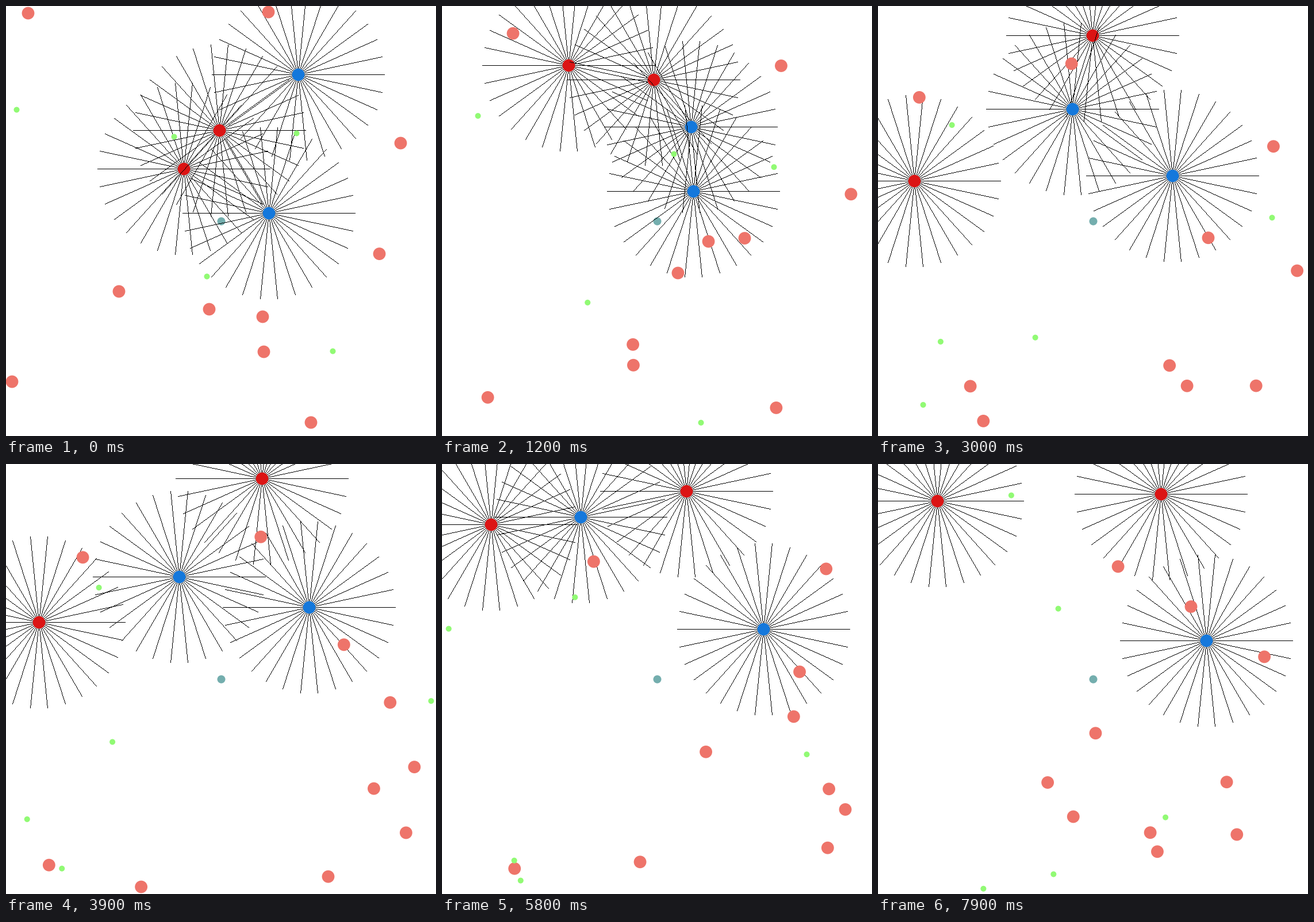
A matplotlib script for the animation above (8 s loop, 748x748 px).

```python
import numpy as np
import matplotlib.pyplot as plt
from matplotlib.animation import FuncAnimation
from matplotlib.patches import Circle

SIZE, DPI = 748, 100
FRAMES, STEP_MS, SUBSTEPS = 80, 100, 20
RED, BLUE = "#dc1414", "#1478dc"
SALMON, GREEN, TEAL = "#ee746a", "#91fa74", "#74aeae"
RAYS, REACH = 30, 150
CENTER, BUMPER = np.array([374.0, 374.0]), 84.5  # unseen ring that drifters bounce off

# Hunters steer along smooth curves through a few key points.
KEYS = np.array([0, 12, 21, 39, 49, 67, 79], float)
HUNTERS = [
    (RED, [(309, 283), (220, 103), (117, 246), (57, 275), (107, 135), (58, 105), (103, 64)]),
    (RED, [(371, 216), (368, 128), (312, 95), (445, 25), (419, 54), (449, 35), (492, 52)]),
    (BLUE, [(508, 119), (433, 210), (400, 167), (301, 196), (349, 161), (70, 5), (-138, -112)]),
    (BLUE, [(457, 360), (437, 322), (489, 330), (527, 249), (557, 225), (555, 348), (571, 307)]),
]

# Drifters fly straight from a start (x, y, vx, vy) and bounce.
PREY = [
    (38, 12, -11.84, 2.93), (353, 527, 9.17, -9.83), (686, 238, 2.08, 7.4),
    (456, 10, 11.12, 7.79), (649, 430.6, -10.25, -2.26), (10, 653, 5.76, 2.28),
    (530, 724, 4.24, -2.13), (446, 540, -9.53, 4.03), (196, 496, 11.37, 10.69),
    (448, 601, -3.17, -11.42),
]
POISON = [
    (18, 180, 3.67, 0.885), (505, 221, 6, 4.89), (349, 470, -8.02, 3.78),
    (568, 600, -9.83, 10.36), (292, 227, 9.25, 2.5),
]
# Caught drifters start afresh: frame -> (index, new state).
REBORN = {
    17: (14, (51, 679, 2.08, 1.1)),
    18: (1, (30, 153.8, -6.86, 0.385)),
    62: (8, (394, 456, -5.4, 5.3)),
}


def advance(pos, vel, lo, hi, dt):
    pos += vel * dt
    low, high = pos < lo, pos > hi
    pos[:] = np.where(low, 2 * lo - pos, np.where(high, 2 * hi - pos, pos))
    vel[low | high] *= -1
    gap = pos - CENTER
    dist = np.linalg.norm(gap, axis=1, keepdims=True)
    normal = gap / dist
    inward = np.sum(vel * normal, axis=1, keepdims=True)
    vel -= np.where((dist < BUMPER) & (inward < 0), 2 * inward, 0) * normal


def simulate():
    """Drifter positions for every frame."""
    state = np.array(PREY + POISON, float)
    pos, vel = state[:, :2], state[:, 2:]
    is_prey = np.arange(len(state))[:, None] < len(PREY)
    lo, hi = np.where(is_prey, 9.5, 4.5), np.where(is_prey, 738.5, 743.5)
    track = []
    for n in range(FRAMES):
        if n in REBORN:
            i, fresh = REBORN[n]
            state[i] = fresh
        track.append(pos.copy())
        pace = 1 if n < 67 else 1.117
        for _ in range(SUBSTEPS):
            advance(pos, vel, lo, hi, pace / SUBSTEPS)
    return track


def glide(pts, slopes, t):
    """Cubic Hermite curve through the key points."""
    i = int(np.clip(np.searchsorted(KEYS, t, "right") - 1, 0, len(KEYS) - 2))
    h = KEYS[i + 1] - KEYS[i]
    s = (t - KEYS[i]) / h
    return ((1 + 2 * s) * (1 - s) ** 2 * pts[i] + s * (1 - s) ** 2 * h * slopes[i]
            + s * s * (3 - 2 * s) * pts[i + 1] + s * s * (s - 1) * h * slopes[i + 1])


def ray_burst():
    """RGBA sprite of crisp one-pixel rays."""
    side = 2 * REACH + 1
    img = np.zeros((side, side, 4))
    for a in np.arange(RAYS) * 2 * np.pi / RAYS:
        tip = np.trunc(REACH * np.array([np.cos(a), np.sin(a)]) + 1e-6 * np.sign(np.cos(a)))
        steps = int(np.abs(tip).max())
        x, y = np.rint(np.outer(tip, np.linspace(0, 1, steps + 1))).astype(int) + REACH
        img[y, x, 3] = 1
    return img


fig = plt.figure(figsize=(SIZE / DPI, SIZE / DPI), dpi=DPI, facecolor="white")
ax = fig.add_axes([0, 0, 1, 1])


def disc(radius, color, z, at=(0, 0)):
    return ax.add_patch(Circle(at, radius, fc=color, ec="none", lw=0, zorder=z))


disc(7, TEAL, 1, CENTER)
burst = ray_burst()
hunters = []
for k, (color, path) in enumerate(HUNTERS):
    pts = np.array(path, float)
    rays = ax.imshow(burst, interpolation="nearest", aspect="auto", zorder=2 + 2 * k)
    hunters.append((pts, np.gradient(pts, KEYS, axis=0), rays, disc(10.8, color, 3 + 2 * k)))
drifters = [disc(10.9, SALMON, 20) for _ in PREY] + [disc(5, GREEN, 21) for _ in POISON]
track = simulate()

ax.set_xlim(-0.5, SIZE - 0.5)
ax.set_ylim(SIZE - 0.5, -0.5)
ax.set_autoscale_on(False)
ax.axis("off")


def draw(n):
    half = REACH + 0.5
    for pts, slopes, rays, body in hunters:
        x, y = np.rint(glide(pts, slopes, n))
        rays.set_extent((x - half, x + half, y + half, y - half))
        body.center = x, y
    for body, pos in zip(drifters, track[n]):
        body.center = tuple(pos)
    return []


anim = FuncAnimation(fig, draw, frames=FRAMES, interval=STEP_MS, repeat=True,
                     repeat_delay=0, init_func=lambda: draw(0), blit=False)
plt.show()
```
